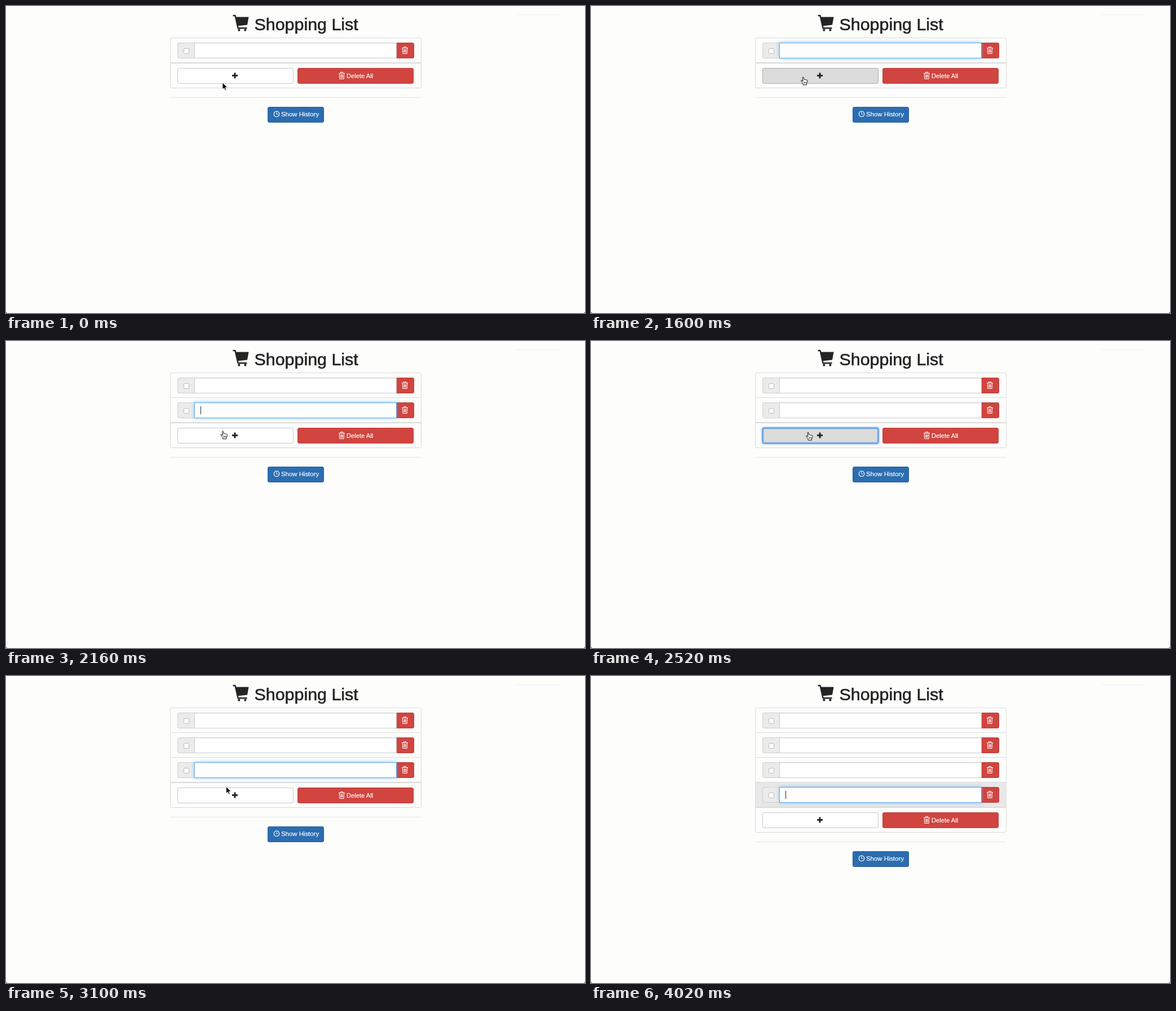
An HTML page for the animation above (4040 ms loop, 1027 px wide and 545 px high).

```html
<!DOCTYPE html>
<html lang="en">
<head>
<meta charset="utf-8">
<title>Shopping List</title>
<style>
html, body { margin: 0; width: 100%; height: 100%; overflow: hidden; background: #fdfdfc; }
body { font-family: "Liberation Sans", Arial, sans-serif; }
div, svg { position: absolute; box-sizing: border-box; }
svg { overflow: visible; }
#stage { left: 0; top: 0; width: 1027px; height: 545px; overflow: hidden; }
.row { left: 291px; width: 446px; height: 45px; border: 1px solid #dcdcdc; }
.row.hover { background: #e8e8e8; }
.row:first-child, .panel { border-radius: 3px 3px 0 0; }
.panel { left: 291px; top: 101px; width: 446px; height: 45px; border: 1px solid #d8d8d8; border-radius: 0 0 3px 3px; }
.addon { left: 12px; top: 8px; width: 31px; height: 28px; background: #ebebeb; border: 1px solid #cfcfcf; border-radius: 3px 0 0 3px; }
.check { left: 10px; top: 9px; width: 10px; height: 10px; background: #fff; border: 1px solid #b8b8b8; border-radius: 2.5px; }
.input, .glow { height: 28px; width: 359px; border: 1px solid #cbcbd0; background: #fefefe; box-shadow: inset 0 1px 1px rgba(0,0,0,.06); }
.input { left: 42px; top: 8px; z-index: 2; }
.glow { left: -1px; top: -1px; border-color: #5facec; box-shadow: inset 0 1px 1px rgba(0,0,0,.06), 0 0 6px rgba(90,172,238,.7); }
.caret { left: 10px; top: 6px; width: 1px; height: 14px; background: #222; }
.red { background: #d04540; border: 1px solid #bb3d38; }
.del { left: 400px; top: 8px; width: 32px; height: 28px; border-radius: 0 3px 3px 0; z-index: 1; }
.btn { height: 28px; border-radius: 3px; color: #fff; }
#add { left: 304px; top: 110px; width: 206px; border: 1px solid #c9c9d0; background: #fefefe; }
#add.hover { background: #dcdcdc; border-color: #adadad; }
#add.focus { border-color: #4d90d6; box-shadow: 0 0 3px 1px #5b9fe2, inset 0 0 2px 1px #6fa9e2; }
#add.down { background: #c9c9cb; }
#all { left: 517px; top: 110px; width: 206px; }
#hist { left: 464px; top: 179px; width: 100px; background: #2b6db0; border: 1px solid #275f9b; }
#hr { left: 292px; top: 162px; width: 444px; height: 1px; background: #e6e6e2; }
#foot { left: 0; top: 0; width: 1027px; height: 250px; }
</style>
</head>
<body>
<div id="stage">
  <div style="left:905px;top:15px;width:78px;height:1px;background:#efefe8"></div>
  <div id="list"></div>
  <div id="foot">
    <div class="panel"></div>
    <div id="add" class="btn"></div>
    <div id="all" class="btn red"></div>
    <div id="hr"></div>
    <div id="hist" class="btn"></div>
    <svg width="1027" height="250" font-size="11.4" fill="#fff" stroke="none">
      <path d="M401 123.5h10M406 118.5v10" stroke="#262626" stroke-width="3"/>
      <use href="#trash" x="590" y="117"/>
      <text x="604" y="127.5" font-size="11.2" stroke="#fff" stroke-width=".2">Delete All</text>
      <circle cx="480" cy="191.7" r="4.8" fill="none" stroke="#fff" stroke-width="1.2"/>
      <path d="M480 188.5v3.5h2.5" fill="none" stroke="#fff"/>
      <text x="488" y="196.3" stroke="#fff" stroke-width=".2">Show History</text>
    </svg>
  </div>
  <svg width="1027" height="545">
    <defs>
      <g id="trash" fill="none" stroke="#fff" stroke-width="1">
        <path d="M0 2.5h11M3.5 2.2V.5h4v1.7M1.3 3l.5 9.5h7.4L9.7 3M3.8 4.5v6.2M5.5 4.5v6.2M7.2 4.5v6.2"/>
      </g>
    </defs>
    <g fill="#242424">
      <path d="M407 19.5H430.5L428 33.5L410.5 35.5Z"/>
      <path d="M402.5 17H406.5L411.5 39.3H427.5" fill="none" stroke="#242424" stroke-width="2.4" stroke-linejoin="round"/>
      <circle cx="413.3" cy="42.7" r="2.1"/>
      <circle cx="424.3" cy="42.7" r="2.1"/>
      <text x="440.5" y="43.3" font-size="30.4" stroke="#242424" stroke-width=".65">Shopping List</text>
    </g>
    <path d="M0 542Q0 545 3 545H0ZM1027 542Q1027 545 1024 545H1027Z" fill="#333"/>
    <g id="pointer">
      <circle id="ring" r="24.5" fill="none" stroke="#111" stroke-width="1.4"/>
      <path id="arrow" d="M0 0V12L2.8 9.4L4.7 13.6L6.7 12.8L4.9 8.7H8.7Z" fill="#000" stroke="#fff" stroke-width=".8"/>
      <g id="hand" transform="translate(-4 -.5)" stroke="#111" stroke-linejoin="round">
        <path d="M4 8.5L2.2 6.7Q.8 5.6.5 7.2L4 12V14.5H10.5V12Q12 10 12 6.6Q11.4 5.4 10 6Q9 4.8 7.6 5.4Q6.8 4.6 5.8 5L5 1.2Q4-.2 3.2 1.2Z" fill="#fff"/>
        <path d="M6 9v3M7.7 9v3M9.4 9v3" stroke-width=".8"/>
      </g>
      <path id="beam" d="M-2.8-5.8Q0-5.8 0-4.3Q0-5.8 2.8-5.8M0-4.5V4.5M-2.8 5.8Q0 5.8 0 4.3Q0 5.8 2.8 5.8M-1.5 2H1.5" fill="none" stroke="#111" stroke-width="1.2"/>
    </g>
  </svg>
</div>
<script>
const LOOP = 4040, STEP = 44, FADE = 110, BLINK = 270;
const ADDS = [1900, 2740, 3850];
const PRESSES = [1640, 2340, 3450];
const FOCUS = [700, ...ADDS];
// time, x, y of the pointer
const PATH = [
  [0, 384, 136], [500, 384, 136], [820, 379.5, 124.5], [1100, 376, 126], [1940, 376, 126],
  [2200, 385, 162], [2850, 385, 162], [3250, 393, 212], [LOOP, 393, 212.5]
];
const $ = id => document.getElementById(id);
const clamp = v => Math.max(0, Math.min(1, v));
const show = (el, on) => { el.style.display = on ? "" : "none"; };

const rows = FOCUS.map((_, i) => {
  const row = document.createElement("div");
  row.className = "row";
  row.style.top = 56 + STEP * i + "px";
  row.innerHTML = `<div class="addon"><div class="check"></div></div>
    <div class="input"><div class="glow"></div><div class="caret"></div></div>
    <div class="del red"><svg width="12" height="13" style="left:9px;top:6px"><use href="#trash"/></svg></div>`;
  $("list").append(row);
  return { row, glow: row.querySelector(".glow"), caret: row.querySelector(".caret") };
});

function pointerAt(t) {
  const i = Math.max(1, PATH.findIndex(p => p[0] >= t));
  const [t0, x0, y0] = PATH[i - 1], [t1, x1, y1] = PATH[i];
  const u = clamp((t - t0) / (t1 - t0)), e = u * u * (3 - 2 * u);
  return [x0 + (x1 - x0) * e, y0 + (y1 - y0) * e];
}

function draw(t) {
  const count = 1 + ADDS.filter(a => t >= a).length;
  const shift = STEP * (count - 1);
  const [x, y] = pointerAt(t);
  const lagY = pointerAt(Math.max(0, t - 45))[1];
  const overAdd = v => t > 850 && v >= 110 + shift && v < 138 + shift;
  const hoverRow = Math.floor((lagY - 56) / STEP);
  const rowY = (y - 56) % STEP;
  const overInput = y < 56 + STEP * count && rowY >= 9 && rowY < 37;

  rows.forEach(({ row, glow, caret }, i) => {
    const start = FOCUS[i], end = PRESSES[i] ?? LOOP;
    show(row, i < count);
    row.classList.toggle("hover", i === hoverRow);
    glow.style.opacity = clamp((t - start - 20) / FADE) * (1 - clamp((t - end) / (FADE * 1.4)));
    show(caret, t >= start && t < end && Math.floor((t - start) / BLINK) % 2 === 0);
  });

  $("foot").style.transform = `translateY(${shift}px)`;
  const down = PRESSES.some(p => t >= p && t < p + 130);
  const held = PRESSES.some((p, i) => t >= p && t < ADDS[i]);
  $("add").classList.toggle("hover", overAdd(lagY));
  $("add").classList.toggle("focus", held);
  $("add").classList.toggle("down", down);

  $("pointer").setAttribute("transform", `translate(${x} ${y})`);
  const hand = overAdd(y);
  show($("ring"), down);
  show($("hand"), hand);
  show($("beam"), overInput);
  show($("arrow"), !hand && !overInput);
}

const begin = performance.now();
function tick() {
  draw((performance.now() - begin) % LOOP);
  requestAnimationFrame(tick);
}
tick();
</script>
</body>
</html>
```
